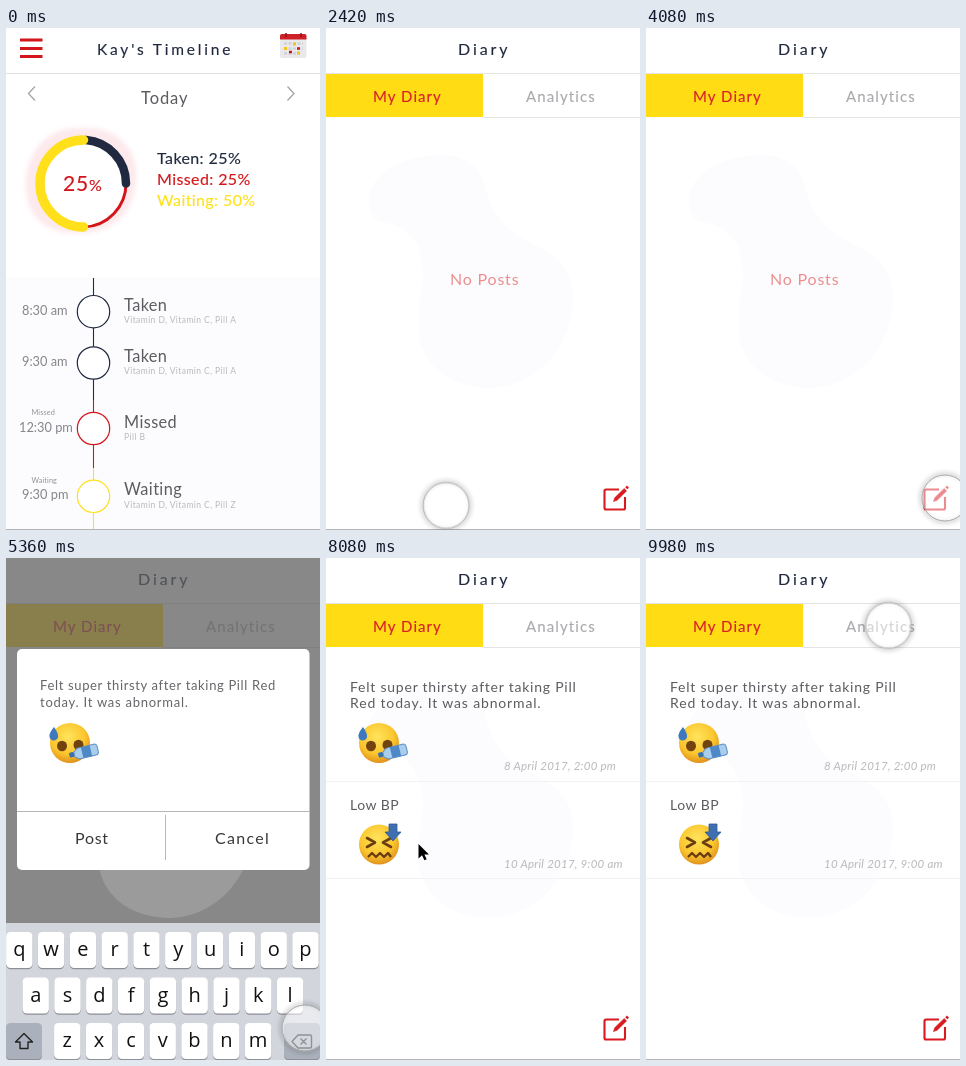
An HTML page for the animation above (10 s loop, 314 px wide and 502 px high).

```html
<!DOCTYPE html>
<html lang="en">
<head>
<meta charset="utf-8">
<title>Pill diary</title>
<style>
  html, body { margin: 0; width: 100%; height: 100%; overflow: hidden; background: #fff; }
  svg { display: block; width: 100vw; height: 100vh; }
  text { font-family: Lato, "Open Sans", sans-serif; white-space: pre; }
  .keys text { font-family: "Open Sans", sans-serif; font-size: 20px; text-anchor: middle; fill: #111; }
  .anim { animation: 10s linear infinite both; }
  .cut { animation-timing-function: step-end; }
  #menu { animation-name: menu; }
  #diary { animation-name: diary; }
  #empty { animation-name: empty; }
  #posts { animation-name: posts; }
  #modal { animation-name: modal; }
  #keyboard { animation-name: keyboard; }
  #arrow { animation-name: arrow; }
  #touch { animation-name: touch; }

  @keyframes menu {
    0%, 10.4% { transform: translate(122.5px, 576px); }
    11.8% { transform: translate(122.5px, 534.5px); animation-timing-function: ease-out; }
    15.2%, 100% { transform: translate(122.5px, 478px); }
  }
  @keyframes diary {
    0%, 16.2% { opacity: 0; }
    17.8%, 100% { opacity: 1; }
  }
  @keyframes empty {
    0% { opacity: 1; }
    66.6%, 100% { opacity: 0; }
  }
  @keyframes posts {
    0% { opacity: 0; }
    66.6%, 100% { opacity: 1; }
  }
  @keyframes modal {
    0%, 45.6% { opacity: 0; }
    48%, 66.4% { opacity: 1; }
    68.6%, 100% { opacity: 0; }
  }
  @keyframes keyboard {
    0%, 45.6% { transform: translateY(138px); animation-timing-function: ease-out; }
    49%, 66.4% { transform: none; animation-timing-function: ease-in; }
    69%, 100% { transform: translateY(138px); }
  }
  @keyframes arrow {
    0% { opacity: 0; }
    67.2% { opacity: 1; }
    86.4%, 100% { opacity: 0; }
  }
  @keyframes touch {
    0%, 10.4% { transform: translate(120px, 562px); opacity: .4; }
    11.8% { transform: translate(120px, 521px); opacity: .4; animation-timing-function: ease-out; }
    15%, 24% { transform: translate(120px, 478px); opacity: 1; animation-timing-function: ease-in-out; }
    31.2%, 33% { transform: translate(205.5px, 156.5px); animation-timing-function: ease-in-out; }
    40.8%, 55.8% { transform: translate(299px, 470px); animation-timing-function: ease-in-out; }
    63.2% { transform: translate(120.5px, 311.5px); }
    65.4%, 66.6% { transform: translate(90px, 284px); opacity: 1; }
    67.2% { transform: translate(90px, 284px); opacity: 0; }
    86.3% { transform: translate(94px, 289px); opacity: 0; }
    86.4% { transform: translate(94px, 289px); opacity: 1; animation-timing-function: ease-in-out; }
    95%, 100% { transform: translate(242.5px, 67.5px); opacity: 1; }
  }
</style>
</head>
<body>
<svg viewBox="0 0 314 502" preserveAspectRatio="none">
  <defs>
    <radialGradient id="skin" cx=".45" cy=".35" r=".65">
      <stop offset="0" stop-color="#ffe45c"/>
      <stop offset=".65" stop-color="#fbc62e"/>
      <stop offset="1" stop-color="#e0921c"/>
    </radialGradient>
    <filter id="soft" x="-20%" y="-20%" width="140%" height="140%"><feGaussianBlur stdDeviation="2.5"/></filter>
    <filter id="shade" x="-30%" y="-30%" width="160%" height="160%"><feGaussianBlur stdDeviation="2"/></filter>
    <path id="blob" d="M43 171C44 145 80 126 118 127C146 128 157 146 161 164C166 186 181 203 205 215C232 228 248 243 247 272C245 322 208 360 162 360C121 359 92 334 92 298C92 272 99 257 96 235C93 205 76 198 56 194C47 192 43 184 43 171Z"/>
    <g id="thirsty">
      <circle cx="53" cy="185" r="20" fill="url(#skin)"/>
      <ellipse cx="45" cy="188" rx="5" ry="5.300" fill="#70430f"/>
      <ellipse cx="61.500" cy="187" rx="5" ry="5.300" fill="#70430f"/>
      <path d="M37 169q-5 6-4.500 9.500a4.300 4.300 0 0 0 8.600-.5q-.4-4-4.100-9Z" fill="#3f78bd"/>
      <g transform="rotate(-14 66 194)">
        <rect x="52" y="191.500" width="5" height="5" rx="1" fill="#3b6fae"/>
        <path d="M57 192l4-3h17q3 0 3 3v5q0 3-3 3h-17l-4-3Z" fill="#a9cdec" stroke="#5f8fc2"/>
        <rect x="65" y="189" width="9" height="11" fill="#4f88c6"/>
      </g>
    </g>
    <g id="dizzy">
      <circle cx="53" cy="286.500" r="20" fill="url(#skin)"/>
      <path d="M41 280l8 4.500-8 4.500M65 280l-8 4.500 8 4.500" fill="none" stroke="#6b3f12" stroke-width="2.600" stroke-linecap="round" stroke-linejoin="round"/>
      <path d="M42 299l4-4 4 4 4-4 4 4 4-4 3 4" fill="none" stroke="#6b3f12" stroke-width="2.400" stroke-linejoin="round"/>
      <path d="M63 266h8v8h4l-8 9-8-9h4Z" fill="#3f6fb0" stroke="#315b96" stroke-width=".8"/>
    </g>
  </defs>

  <g id="timeline">
    <rect width="314" height="502" fill="#fff"/>
    <rect y="250" width="314" height="252" fill="#fcfcfe"/>
    <path d="M0 45.500H314" stroke="#e2e2e4"/>
    <path d="M14 12h22.500M14 20.500h22.500M14 28.500h22.500" stroke="#d3161b" stroke-width="3"/>
    <rect x="274" y="6" width="26.500" height="24" rx="2" fill="#e9e9ec"/>
    <path d="M274 11.500V8q0-2 2-2h22.500q2 0 2 2v3.500Z" fill="#cf2027"/>
    <path d="M280 5v4M295 5v4" stroke="#8f1419" stroke-width="1.500"/>
    <path d="M278 15.500h19M278 20.500h19M278 25.500h16" stroke="#d0d0d6" stroke-width="2.500" stroke-dasharray="3 1.500"/>
    <path d="M287 16h3M278 20.500h3M291 25h3" stroke="#f2c51c" stroke-width="3"/>
    <path d="M283 24h3M291 20.500h3" stroke="#d3161b" stroke-width="2.500"/>
    <path d="M29 58.500l-6.500 7 6.500 7M281.500 58.500l6.500 7-6.500 7" fill="none" stroke="#a5a5a8" stroke-width="1.300"/>
    <path d="M20 160C18 132 35 100 72 100C108 97 133 118 130 151C129 184 107 206 73 205C43 207 20 190 20 160Z" fill="#fce9ec" filter="url(#soft)"/>
    <circle cx="76.500" cy="155.500" r="43" fill="#fff"/>
    <g fill="none" stroke-linecap="round">
      <path d="M120 155.500A43.500 43.500 0 0 1 78 199" stroke="#d3161b" stroke-width="3"/>
      <path d="M80 112.100A43.500 43.500 0 0 1 120 155.500" stroke="#20293f" stroke-width="8.500"/>
      <path d="M77.500 199A43.500 43.500 0 1 1 77.500 112" stroke="#ffe01a" stroke-width="9.500"/>
    </g>
    <g id="schedule"></g>
    <g id="menu" class="anim"><circle r="72" fill="none" stroke="#0b0b0b" stroke-width="3"/></g>
  </g>

  <g id="diary" class="anim">
    <rect width="314" height="502" fill="#fff"/>
    <use href="#blob" fill="#fcfcff"/>
    <path d="M0 45.500H314M157 89.500H314" stroke="#e4e4e6"/>
    <rect y="46" width="157" height="43" fill="#ffdc14"/>
    <g id="tabs"></g>
    <g id="empty" class="anim cut"></g>
    <g id="posts" class="anim cut">
      <path d="M0 223.500H314M0 320.500H314" stroke="#f2f2f5"/>
      <use href="#thirsty"/>
      <use href="#dizzy"/>
    </g>
    <g fill="none" stroke="#d8191f" stroke-width="2.100" stroke-linejoin="round">
      <path d="M293 461.500H280q-1.500 0-1.500 1.500v17q0 1.500 1.500 1.500h17.500q1.500 0 1.500-1.500V469"/>
      <path d="M287.500 473.500l1.200-3.700 9.500-9.300 2.400 2.400-9.500 9.400Z" fill="#d8191f" stroke-width=".6"/>
      <path d="M300.300 460.300l1.700-1.700" stroke-width="3"/>
    </g>
  </g>

  <path d="M0 501.500H314" stroke="#b4b4b6"/>

  <g id="modal" class="anim">
    <rect width="314" height="502" fill="#606060" opacity=".75"/>
    <use href="#blob" fill="#fff" opacity=".16"/>
    <rect x="11" y="91" width="292.500" height="221" rx="5" fill="#fff"/>
    <path d="M11 253.500H303.500M159.500 257V302" stroke="#b6b6b8"/>
    <use href="#thirsty" x="11"/>
  </g>
  <g id="keyboard" class="anim keys">
    <rect y="365" width="314" height="137" fill="#d2d5dc"/>
  </g>

  <path id="arrow" class="anim cut" d="M92.500 286v14.500l3.500-3.200 2.400 5 2.300-1-2.300-4.900h4.600Z" fill="#000" stroke="#fff" stroke-width="1.200" paint-order="stroke"/>
  <g id="touch" class="anim">
    <circle r="24" fill="none" stroke="#000" stroke-opacity=".2" stroke-width="3" filter="url(#shade)"/>
    <circle r="23" fill="#fff" fill-opacity=".5" stroke="#a8a8aa"/>
  </g>
</svg>
<script>
  const NAVY = '#20293f', RED = '#d3161b', YELLOW = '#ffe01a', GREY = '#5c5c60', PALE = '#b9b9bd';
  const add = (id, markup) => document.getElementById(id).insertAdjacentHTML('beforeend', markup);
  const text = (x, y, size, fill, gap, str, extra = '') =>
    `<text x="${x}" y="${y}" font-size="${size}" fill="${fill}" letter-spacing="${gap}" ${extra}>${str}</text>`;
  const firm = fill => `stroke="${fill}" stroke-width=".15"`;

  // Timeline page
  add('schedule', [
    text(91, 27, 15.5, NAVY, 2.8, "Kay's Timeline", firm(NAVY)),
    text(135, 76, 16.5, GREY, 0.9, 'Today'),
    text(57, 163, 21, RED, 0.8, '25<tspan font-size="16">%</tspan>', firm(RED)),
    text(151, 136, 16, NAVY, 0.4, 'Taken: 25%', firm(NAVY)),
    text(151, 157, 16, RED, 0.4, 'Missed: 25%', firm(RED)),
    text(151, 178, 16, YELLOW, 0.4, 'Waiting: 50%', firm(YELLOW)),
    ...[[250, 372, NAVY], [372, 440, RED], [440, 502, YELLOW]].map(([a, b, c]) =>
      `<path d="M87.500 ${a}V${b}" stroke="${c}" stroke-width="1.100"/>`)
  ].join(''));

  const doses = [
    [283.7, NAVY, 16, '8:30 am', 'Taken', 'Vitamin D, Vitamin C, Pill A'],
    [335, NAVY, 16, '9:30 am', 'Taken', 'Vitamin D, Vitamin C, Pill A'],
    [400.5, RED, 13, '12:30 pm', 'Missed', 'Pill B'],
    [468.3, YELLOW, 16, '9:30 pm', 'Waiting', 'Vitamin D, Vitamin C, Pill Z']
  ];
  for (const [y, color, x, time, state, pills] of doses) {
    add('schedule',
      `<circle cx="87.500" cy="${y}" r="16.200" fill="#fff" stroke="${color}" stroke-width="1.200"/>` +
      text(x, y + 3, 12.8, '#85858a', 0, time) +
      text(118, y - 1, 16.3, GREY, 0.4, state) +
      text(118, y + 11.3, 8.5, PALE, 0.42, pills) +
      (color === NAVY ? '' : text(25.5, y - 13.5, 7.3, '#929296', 0.1, state)));
  }

  // Diary page
  add('tabs',
    text(132, 27, 16, NAVY, 2.9, 'Diary', firm(NAVY)) +
    text(47, 74, 15, '#d8202a', 1.05, 'My Diary', firm('#d8202a')) +
    text(200, 74, 15, '#ababaf', 1.1, 'Analytics', firm('#ababaf')));
  add('empty', text(124, 257, 16, '#ee8d8d', 0.8, 'No Posts'));
  const italic = 'font-style="italic"';
  add('posts',
    text(24, 134, 14, GREY, 0.77, 'Felt super thirsty after taking Pill') +
    text(24, 150, 14, GREY, 0.85, 'Red today. It was abnormal.') +
    text(178, 212, 11.5, PALE, 0.25, '8 April 2017, 2:00 pm', italic) +
    text(24, 252, 14, GREY, 0.5, 'Low BP') +
    text(178, 310, 11.5, PALE, 0.25, '10 April 2017, 9:00 am', italic));

  // New post
  add('modal',
    text(34, 132, 13, '#66666a', 0.65, 'Felt super thirsty after taking Pill Red') +
    text(34, 149, 13, '#66666a', 0.75, 'today. It was abnormal.') +
    text(69, 286, 16, '#38383c', 0.7, 'Post') +
    text(209, 286, 16, '#38383c', 1.3, 'Cancel'));

  const key = (x, y, w, fill) =>
    `<rect x="${x}" y="${y + 1.2}" width="${w}" height="36" rx="4.500" fill="#8d9096"/>` +
    `<rect x="${x}" y="${y}" width="${w}" height="36" rx="4.500" fill="${fill}"/>`;
  [['qwertyuiop', 13.3, 374], ['asdfghjkl', 29.7, 419.5], ['zxcvbnm', 61.3, 465]].forEach(([row, x0, y]) =>
    [...row].forEach((c, i) => {
      const x = x0 + i * 31.8;
      add('keyboard', key(x - 13.2, y, 26.4, '#fff') + `<text x="${x}" y="${y + 24}">${c}</text>`);
    }));
  add('keyboard', key(0, 465, 36, '#abb1bc') + key(278, 465, 36, '#abb1bc') +
    `<g fill="none" stroke="#222" stroke-width="1.400" stroke-linejoin="round">
      <path d="M18 475.500l8.500 8.500h-4.500v6.500h-8V484H9.500Z"/>
      <path d="M286 483.500l6-6.500h12q1.500 0 1.500 1.500v10q0 1.500-1.500 1.500h-12ZM294.500 480.500l6 6M300.500 480.500l-6 6"/>
    </g>`);
</script>
</body>
</html>
```
